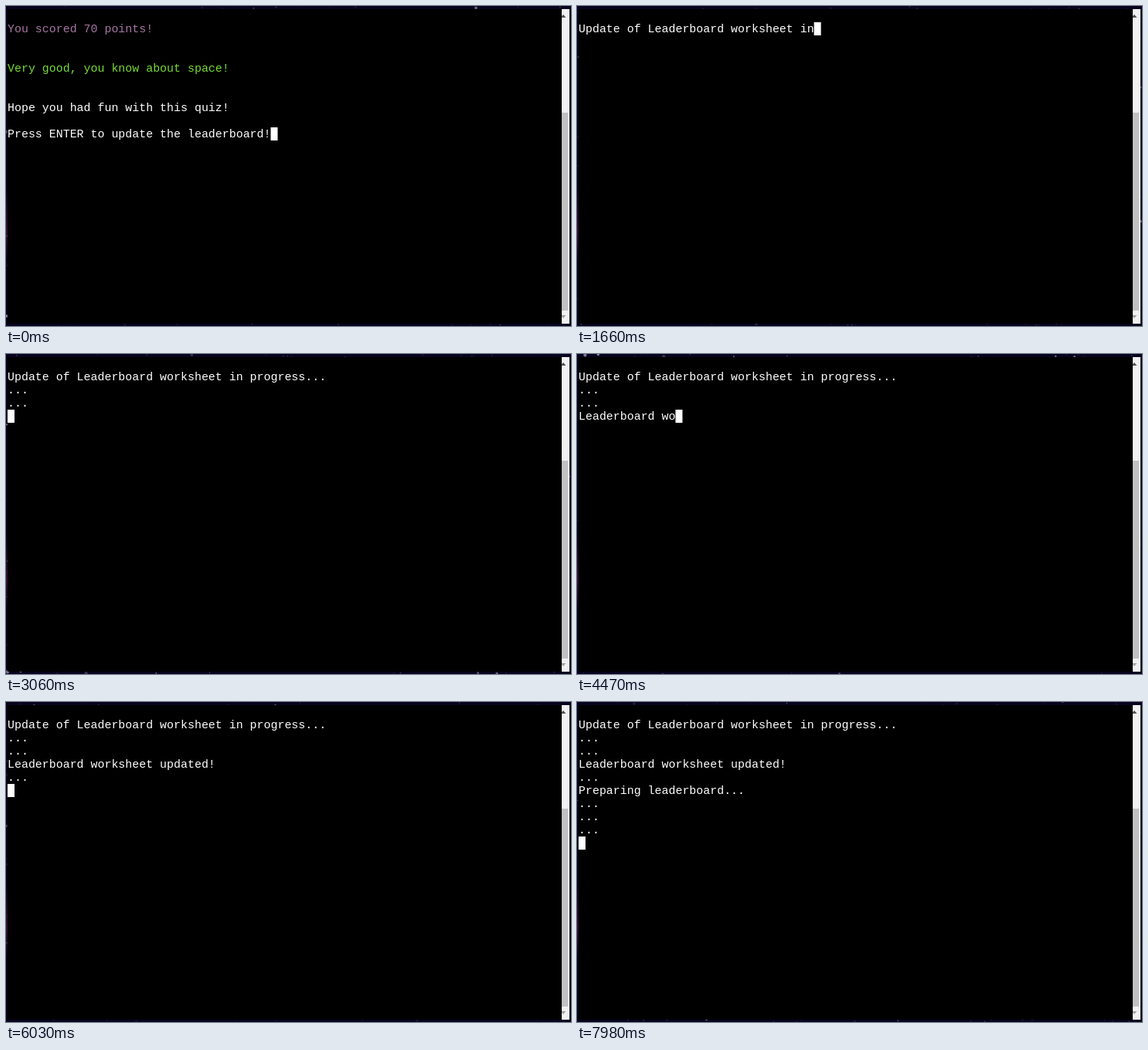
Recreate the animation shown at these times as an HTML page with a canvas. Size 731 by 414 pixels, loop 8 s.

```html
<!DOCTYPE html>
<html lang="en">
<head>
<meta charset="utf-8">
<title>Quiz terminal</title>
<style>
html, body { margin: 0; width: 100%; height: 100%; overflow: hidden; background: #000; }
canvas { display: block; }
</style>
</head>
<body>
<canvas id="stage" width="731" height="414"></canvas>
<script>
const W = 731, H = 414, LOOP = 8000;
const LEFT = 2, TOP = 21, CELL = 8.96, LINE = 17, CHAR_MS = 24;
const ctx = document.getElementById('stage').getContext('2d');

// Bursts of screen refreshes: first, last, count
const bursts = [
  [90, 640, 8], [790, 1570, 11], [1660, 2350, 10], [2510, 2810, 5],
  [2970, 3750, 11], [3840, 4300, 7], [4470, 4540, 2], [4710, 5490, 11],
  [5560, 6350, 11], [6420, 7200, 11], [7290, 7980, 10]
];

const CLEAR = 640;
const result = [
  [0, '#a577a2', 'You scored 70 points!'],
  [3, '#78dc38', 'Very good, you know about space!'],
  [6, '#fff', 'Hope you had fun with this quiz!'],
  [8, '#fff', 'Press ENTER to update the leaderboard!']
];
const typed = [
  [832, 'Update of Leaderboard worksheet in progress...\n...\n...\n'],
  [4122, 'Leaderboard worksheet updated!\n...\n'],
  [6050, 'Preparing leaderboard...\n...\n'],
  [7746, '...\n...\n']
];

let seed = 41;
function random() {
  seed = (seed * 16807) % 2147483647;
  return seed / 2147483647;
}

const stars = Array.from({ length: 1500 }, () => ({
  x: random() * W,
  y: random() * H,
  r: 0.5 + 1.6 * random() ** 3,
  a: 0.08 + 0.6 * random() ** 4
}));

function snap(t) {
  let last = 0;
  for (const [from, to, count] of bursts) {
    if (t < from) break;
    const step = (to - from) / (count - 1);
    last = from + step * Math.min(count - 1, Math.floor((t - from) / step + 1e-6));
  }
  return last;
}

function box(color, x, y, w, h) {
  ctx.fillStyle = color;
  ctx.fillRect(x, y, w, h);
}

function drawSpace(t) {
  box('#07031f', 0, 0, W, H);
  const glow = ctx.createLinearGradient(0, 235, 0, 330);
  glow.addColorStop(0, 'rgba(60,18,62,0)');
  glow.addColorStop(0.6, 'rgba(60,18,62,.9)');
  glow.addColorStop(1, 'rgba(60,18,62,0)');
  box(glow, 0, 235, 4, 95);
  for (const s of stars) {
    ctx.fillStyle = `rgba(205,200,230,${s.a})`;
    ctx.beginPath();
    ctx.arc((s.x + t * 0.006) % W, (s.y + t * 0.003) % H, s.r, 0, 7);
    ctx.fill();
  }
}

function arrow(color, y, dir) {
  ctx.fillStyle = color;
  ctx.beginPath();
  ctx.moveTo(717.5, y + 2 * dir);
  ctx.lineTo(724.5, y + 2 * dir);
  ctx.lineTo(721, y - 2 * dir);
  ctx.fill();
}

function drawScrollbar() {
  box('#f1f1f1', 719, 4, 10, 407);
  box('#c1c1c1', 719, 138, 8, 256);
  ctx.save();
  ctx.beginPath();
  ctx.rect(719, 4, 10, 407);
  ctx.clip();
  arrow('#505050', 13, 1);
  arrow('#a3a3a3', 402, -1);
  ctx.restore();
}

function drawText(row, color, text) {
  ctx.fillStyle = color;
  [...text].forEach((c, i) => {
    ctx.fillText(c, LEFT + i * CELL, TOP + row * LINE + 13);
  });
}

function drawCursor(row, col) {
  box('#fff', LEFT + col * CELL, TOP + row * LINE, 9, LINE);
}

function drawTerminal(t) {
  box('#000', 2, 4, 717, 407);
  ctx.font = '14.93px "Liberation Mono", "Courier New", monospace';
  if (t < CLEAR) {
    for (const line of result) drawText(...line);
    const [row, , text] = result[result.length - 1];
    drawCursor(row, text.length);
    return;
  }
  const output = typed.map(([start, text]) =>
    text.slice(0, Math.max(0, Math.floor((t - start) / CHAR_MS)))).join('');
  const lines = output.split('\n');
  lines.forEach((text, row) => drawText(row, '#fff', text));
  drawCursor(lines.length - 1, lines[lines.length - 1].length);
}

const begin = performance.now();
function render() {
  const t = snap((performance.now() - begin) % LOOP);
  drawSpace(t);
  drawTerminal(t);
  drawScrollbar();
  requestAnimationFrame(render);
}
render();
</script>
</body>
</html>
```
